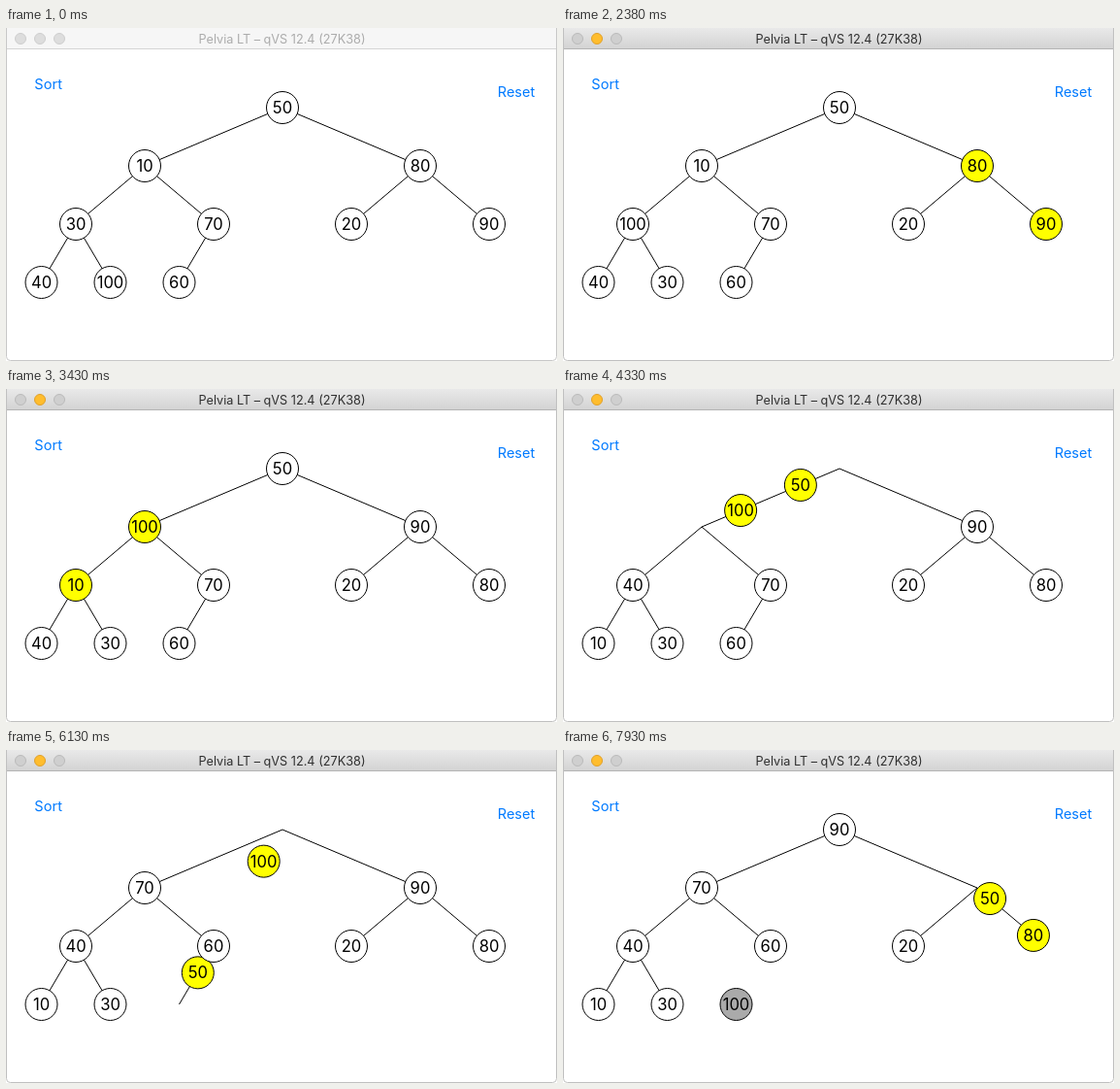
Animation of 568x343 px, one loop 8 s. Source, as an HTML page with a canvas:

```html
<!DOCTYPE html>
<html lang="en">
<head>
<meta charset="utf-8">
<title>Heap sort</title>
<style>
  html, body { margin: 0; width: 100%; height: 100%; overflow: hidden; background: #fff; }
  canvas { display: block; }
</style>
</head>
<body>
<canvas id="stage" width="568" height="343"></canvas>
<script>
const ctx = document.getElementById('stage').getContext('2d');
const W = 568, H = 343, LOOP = 8000;
const FONT = 'Inter, Roboto, "Liberation Sans", sans-serif';

const VALUES = [50, 10, 80, 30, 70, 20, 90, 40, 100, 60];
const MOVE = 410;
const LOCK_AT = 6600;
const ACTIVE_AT = 1190;

// Heap slots to exchange, start time, time the pair stays highlighted
const SWAPS = [
  [3, 8, 1776, 470],
  [2, 6, 2379, 460],
  [1, 3, 2979, 460],
  [3, 7, 3579, 460],
  [0, 1, 4179, 460],
  [1, 4, 4779, 460],
  [4, 9, 5400, 415],
  [0, 9, 6009, 415],
  [0, 2, 7210, 460],
  [2, 6, 7808, 460]
];

// Pointer tip from each time on; no position means hidden
const POINTER = [[0], [750, 19, 62], [890, 40, 56], [1480, 30, 62], [1630]];

const SPOTS = VALUES.map((_, i) => {
  const depth = Math.floor(Math.log2(i + 1));
  const row = 2 ** depth;
  return { x: 1 + W * (i + 1.5 - row) / row, y: 82 + 60 * depth };
});

// The screen refreshes in coarse steps
function snap(t) {
  if (t < ACTIVE_AT) return t;
  const [from, step] = t < 2380 ? [ACTIVE_AT, 148.5] : [2380, 150];
  return from + step * Math.floor((t - from) / step);
}

// Cubic ease-in-out with handles at 0.42 and 0.58
function ease(x) {
  if (x <= 0) return 0;
  if (x >= 1) return 1;
  let lo = 0, hi = 1, s = 0.5;
  for (let i = 0; i < 24; i++) {
    s = (lo + hi) / 2;
    const bx = 1.26 * s * (1 - s) ** 2 + 1.74 * s * s * (1 - s) + s ** 3;
    if (bx < x) lo = s; else hi = s;
  }
  return s * s * (3 - 2 * s);
}

const mix = (p, q, k) => ({ x: p.x + (q.x - p.x) * k, y: p.y + (q.y - p.y) * k });

function layout(t) {
  const order = VALUES.map((_, i) => i);
  const nodes = VALUES.map(value => ({ value, fill: '#fff' }));
  let moving = null;
  for (const [a, b, start, hold] of SWAPS) {
    if (t < start) break;
    if (t < start + hold) {
      moving = { a, b, k: ease((t - start) / MOVE) };
      break;
    }
    [order[a], order[b]] = [order[b], order[a]];
  }
  order.forEach((id, slot) => { nodes[id].at = SPOTS[slot]; });
  if (moving) {
    const { a, b, k } = moving;
    const first = nodes[order[a]], second = nodes[order[b]];
    first.at = mix(SPOTS[a], SPOTS[b], k);
    second.at = mix(SPOTS[b], SPOTS[a], k);
    first.fill = second.fill = '#ff0';
  }
  if (t >= LOCK_AT) nodes[order[9]].fill = '#aaa';
  return nodes;
}

function disc(x, y, r, fill, stroke) {
  ctx.beginPath();
  ctx.arc(x, y, r, 0, Math.PI * 2);
  ctx.fillStyle = fill;
  ctx.fill();
  ctx.strokeStyle = stroke;
  ctx.stroke();
}

function label(text, x, y, size, color, align) {
  ctx.font = size + 'px ' + FONT;
  ctx.textAlign = align;
  ctx.fillStyle = color;
  ctx.fillText(text, x, y);
}

function drawWindow(active) {
  ctx.fillStyle = '#fff';
  ctx.fillRect(0, 0, W, H);

  const bar = ctx.createLinearGradient(0, 0, 0, 22);
  bar.addColorStop(0, active ? '#e9e9e9' : '#f6f6f6');
  bar.addColorStop(1, active ? '#d2d2d2' : '#f6f6f6');
  ctx.fillStyle = bar;
  ctx.fillRect(0, 0, W, 22);
  ctx.fillStyle = active ? '#b4b4b4' : '#d4d4d4';
  ctx.fillRect(0, 21, W, 1);

  ctx.lineWidth = 1;
  ctx.strokeStyle = active ? '#c0c0c0' : '#c8c8c8';
  ctx.beginPath();
  ctx.roundRect(0.5, -0.5, W - 1, H, [0, 0, 4, 4]);
  ctx.stroke();

  const dim = active ? ['#cfcfcf', '#bababa'] : ['#dddddd', '#cecece'];
  const lit = active ? ['#ffbd2e', '#e0a02a'] : dim;
  [dim, lit, dim].forEach(([fill, edge], i) => disc(15 + 20 * i, 11, 5.5, fill, edge));
  label('Pelvia LT – qVS 12.4 (27K38)', 284.5, 16, 12.7, active ? '#303030' : '#acacac', 'center');
}

function drawButtons(t) {
  const fade = t < ACTIVE_AT ? 1 : Math.min(1, 0.25 + (t - ACTIVE_AT) / 600);
  ctx.globalAlpha = fade;
  label('Sort', 29.3, 62.5, 14.6, '#007aff', 'left');
  ctx.globalAlpha = 1;
  label('Reset', 545.2, 70.5, 14.5, '#007aff', 'right');
}

function drawTree(t) {
  ctx.lineWidth = 1;
  ctx.strokeStyle = '#000';
  ctx.beginPath();
  const count = t >= LOCK_AT ? 9 : 10;
  for (let i = 1; i < count; i++) {
    const top = SPOTS[(i - 1) >> 1];
    ctx.moveTo(top.x, top.y);
    ctx.lineTo(SPOTS[i].x, SPOTS[i].y);
  }
  ctx.stroke();
  for (const { value, fill, at } of layout(t)) {
    disc(at.x, at.y, 16.5, fill, '#000');
    label(value, at.x, at.y + 6, 16.6, '#000', 'center');
  }
}

function drawPointer(t) {
  const [, x, y] = POINTER.filter(p => t >= p[0]).pop();
  if (x === undefined) return;
  const shape = [[0, 0], [0, 13.5], [3, 10.8], [5.2, 16], [7.5, 15], [5.3, 10], [9.6, 10]];
  ctx.beginPath();
  shape.forEach(([dx, dy]) => ctx.lineTo(x + 1 + dx, y + 1 + dy));
  ctx.closePath();
  ctx.lineJoin = 'round';
  ctx.lineWidth = 2;
  ctx.strokeStyle = '#fff';
  ctx.stroke();
  ctx.fillStyle = '#000';
  ctx.fill();
}

function frame() {
  const t = snap(performance.now() % LOOP);
  drawWindow(t >= ACTIVE_AT);
  drawButtons(t);
  drawTree(t);
  drawPointer(t);
  requestAnimationFrame(frame);
}
frame();
</script>
</body>
</html>
```
